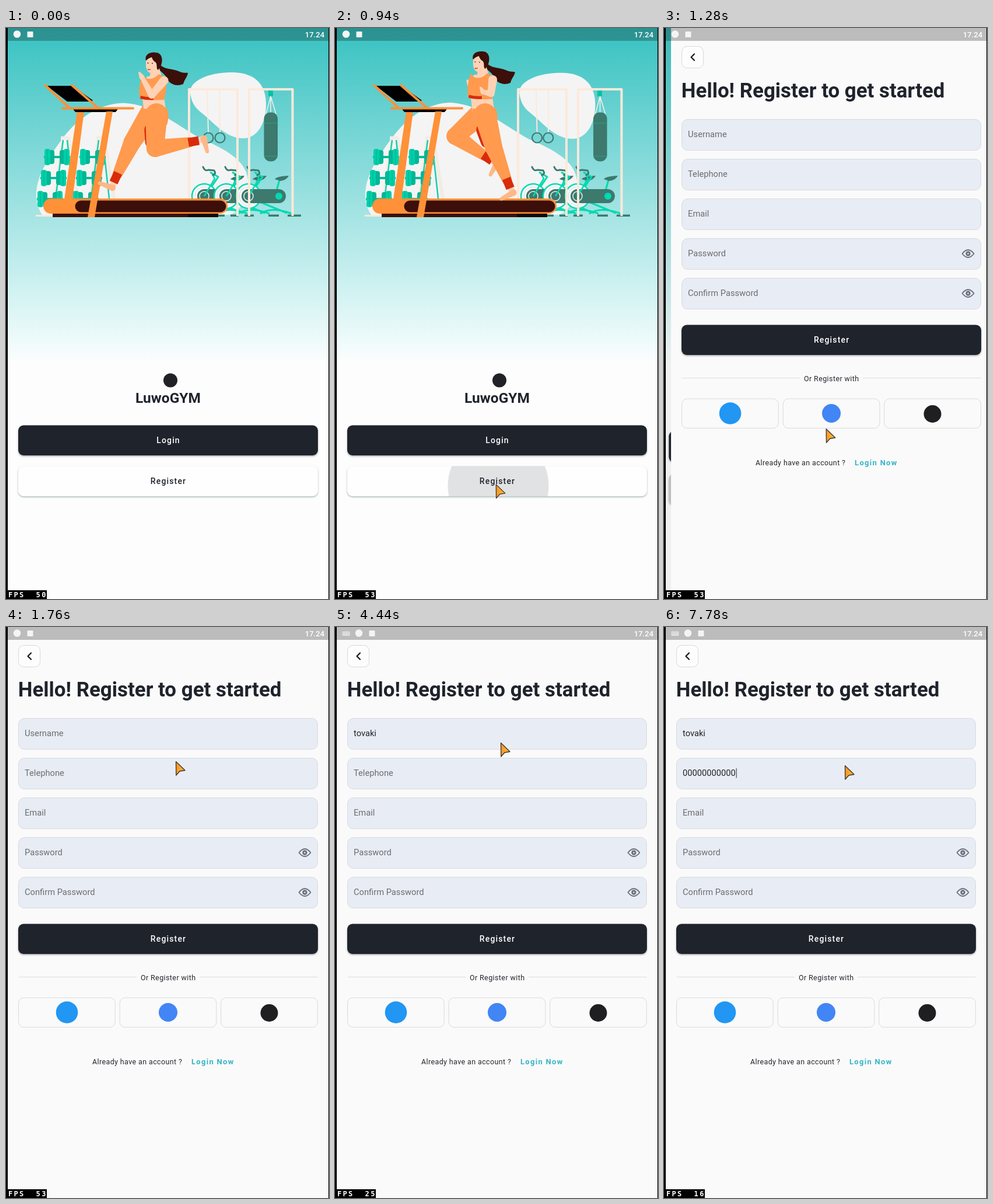
An HTML page with a canvas for the animation above (8000 ms loop, 554 by 978 pixels).

```html
<!DOCTYPE html>
<html lang="en">
<head>
<meta charset="utf-8">
<title>Gym sign-up</title>
<style>
html, body { margin: 0; width: 100%; height: 100%; overflow: hidden; background: #000; }
canvas { display: block; width: 554px; height: 978px; }
</style>
</head>
<body>
<canvas id="stage" width="554" height="978"></canvas>
<script>
const ctx = document.getElementById('stage').getContext('2d');
const LOOP = 8000, STRIDE = 1200, BLINK = 460;
const ORANGE = '#ff9a4f', STEEL = '#ff9138', SKIN = '#ffd2b5', RED = '#d92b0b', HAIR = '#3d0f0a';
const TEAL = '#00d9b2', PINE = '#3d796d', CREAM = '#fde9da', CLOUD = '#f4f4f4', INK = '#1f232c';

const SLIDE = 1053.7, FOCUS_NAME = 2300, FOCUS_PHONE = 5050;
const NAME = 'tovaki', NAME_KEYS = [2980, 3060, 3180, 3310, 3490, 3640];
const PHONE = '00000000000';
const PHONE_KEYS = [5840, 6200, 6330, 6590, 6720, 6980, 7110, 7310, 7440, 7710, 7780];
const FPS = [[0, 50], [740, 53], [1950, 40], [2980, 25], [4950, 14], [5920, 12], [7000, 16]];
const POINTER = [[0, 289, 985], [90, 289, 985], [450, 280, 796], [600, 280, 796], [860, 276, 782],
  [1140, 275, 779], [1680, 291, 230], [1840, 291, 230], [2200, 284, 198], [4500, 284, 198], [5000, 310, 237]];
// phase, thigh angle, shin angle; degrees from straight down, forward is positive
const GAIT = [[0, 2, -100], [.2, 32, -80], [.34, 60, -40], [.45, 56, -2], [.5, 33, 25],
  [.65, 12, 2], [.8, -18, -25], [.95, 0, -63], [1, 2, -100]];

const lerp = (a, b, k) => a + (b - a) * k;
const clamp = v => Math.max(0, Math.min(1, v));
const smooth = k => k * k * (3 - 2 * k);
const mix = (a, b, k) => a.map((v, i) => lerp(v, b[i], k));

function sample(keys, t, ease = k => k) {
  const i = keys.findIndex(k => k[0] > t);
  if (i < 0) return keys[keys.length - 1].slice(1);
  const a = keys[i - 1], b = keys[i];
  return mix(a, b, ease((t - a[0]) / (b[0] - a[0]))).slice(1);
}

function slideEase(x) {
  const bez = (s, a, b) => 3 * s * (1 - s) ** 2 * a + 3 * s * s * (1 - s) * b + s ** 3;
  let lo = 0, hi = 1;
  for (let i = 0; i < 20; i++) {
    const mid = (lo + hi) / 2;
    if (bez(mid, .35, .33) < x) lo = mid; else hi = mid;
  }
  return x >= 1 ? 1 : bez(lo, .91, .97);
}

function shape(d, fill) {
  ctx.fillStyle = fill;
  ctx.fill(new Path2D(d));
}
function line(d, color, width, cap = 'butt') {
  ctx.strokeStyle = color;
  ctx.lineWidth = width;
  ctx.lineCap = cap;
  ctx.lineJoin = 'round';
  ctx.stroke(new Path2D(d));
}
function disc(x, y, r, fill, stroke, width = 1) {
  ctx.beginPath();
  ctx.arc(x, y, r, 0, 7);
  if (fill) { ctx.fillStyle = fill; ctx.fill(); }
  if (stroke) { ctx.strokeStyle = stroke; ctx.lineWidth = width; ctx.stroke(); }
}
function box(x, y, w, h, r, fill, stroke, shadow) {
  ctx.save();
  ctx.beginPath();
  ctx.roundRect(x, y, w, h, r);
  if (shadow) { ctx.shadowColor = shadow; ctx.shadowBlur = 3; ctx.shadowOffsetY = 1.5; }
  if (fill) { ctx.fillStyle = fill; ctx.fill(); }
  ctx.shadowColor = 'transparent';
  if (stroke) { ctx.strokeStyle = stroke; ctx.lineWidth = 1; ctx.stroke(); }
  ctx.restore();
}
function text(s, x, y, size, weight, color, spacing = 0, align = 'left', family = 'Roboto, sans-serif') {
  ctx.font = `${weight} ${size}px ${family}`;
  ctx.letterSpacing = spacing + 'px';
  ctx.textAlign = align;
  ctx.fillStyle = color;
  ctx.fillText(s, x, y);
}
// Tapered round-ended segment
function limb([x1, y1], [x2, y2], r1, r2, color) {
  const a = Math.atan2(y2 - y1, x2 - x1);
  ctx.beginPath();
  ctx.arc(x1, y1, r1, a + Math.PI / 2, a - Math.PI / 2);
  ctx.arc(x2, y2, r2, a - Math.PI / 2, a + Math.PI / 2);
  ctx.closePath();
  ctx.fillStyle = color;
  ctx.fill();
}

function drawBlobs(sway) {
  const dx = -8 * sway, top = 128.5 - 2 * sway;
  shape(`M62 320C40 285 55 245 95 192C125 150 ${165 + dx} ${top} ${203 + dx} ${top}C${255 + dx} 132 ${290 + dx} 165 ${335 + dx} 190C${390 + dx} 213 420 235 415 275C410 300 395 320 380 320Z`, CLOUD);
  ctx.save();
  ctx.translate(sway, 2 * sway);
  shape('M316 112C313 90 350 76 385 76C425 75 446 95 446 130C446 165 430 190 405 189C375 188 355 160 335 145C322 135 318 125 316 112Z', CLOUD);
  ctx.restore();
}

function drawWeights() {
  for (const x of [0, 61]) {
    line(`M${97 + x} 188L${80 + x} 318M${94 + x} 188h14`, '#f3ece4', 5);
    line(`M${107 + x} 188L${124 + x} 292`, '#f3ece4', 6);
    line(`M${98 + x} 192L${85 + x} 292M${105 + x} 192L${116 + x} 292`, '#16cfae', 2.5);
    for (let row = 0; row < 3; row++) {
      const y = 221 + 36 * row, left = 73 + x - 6 * row;
      line(`M${left - 8} ${y}h45`, '#00bb9a', 4);
      for (const [px, dir] of [[left, 1], [left + 29, -1]]) {
        box(px - 5 + 5 * dir, y - 12, 10, 24, 4, '#00b795');
        box(px - 5 - 2 * dir, y - 14, 10, 28, 4, '#00cfa9');
        line(`M${px - 2 * dir} ${y - 12}v24`, '#00b18f', 1);
      }
    }
  }
}

function drawBike(x) {
  line(`M${x + 1} 289L${x + 24} 255L${x + 10} 247M${x + 54} 257L${x + 42} 300M${x} 290L${x + 66} 317M${x + 20} 318Q${x + 40} 305 ${x + 74} 318`, TEAL, 3);
  disc(x, 288, 21, '#fbfbfb', TEAL, 2.5);
  for (const r of [16, 12]) disc(x, 288, r, null, '#cfdedb');
  line(`M${x} 288h52`, PINE, 24, 'round');
  disc(x, 288, 8, PINE, '#e8f4f1', 1.5);
  disc(x + 52, 288, 6, TEAL);
  line(`M${x} 288L${x + 18} 258L${x + 12} 247`, TEAL, 2.5);
  line(`M${x - 2} 238q3 8 9 5l10 1q4 6 -2 8`, PINE, 3, 'round');
  shape(`M${x + 45} 259q3 -5 24 -6q-3 7 -14 9z`, PINE);
}

function drawGear(sway) {
  for (const x of [340, 378, 416]) drawBike(x);
  for (const [x, w] of [[364, 11], [385, 14], [409, 16], [450, 18], [483, 23]]) box(x, 319.5, w, 3.5, 0, PINE);
  const swing = -3 * sway;
  line(`M345 107L${347 + swing / 3} 179M366 107L${367 + swing} 179`, CREAM, 2);
  disc(347 + swing / 3, 188, 8.5, null, PINE, 2.2);
  disc(367 + swing, 188, 8.5, null, PINE, 2.2);
  line('M314 322V105H397V322M417 322V105H491.5V322', CREAM, 4);
  box(450, 107, 8, 10, 0, '#00c4a3');
  ctx.save();
  ctx.translate(1.5 * sway, 0);
  line('M454 117L446 147M454 117L463 147M454 117v30', '#f6efe8', 1.5);
  box(442.5, 144.5, 23.5, 84, 11, PINE);
  line('M443 163h23M443 219.5h23', '#23a48f', 1);
  ctx.restore();
}

function drawTreadmill() {
  line('M51 321.5h30', CREAM, 3);
  box(80, 316, 284, 8, 0, HAIR);
  box(312, 318, 52, 6, 0, '#170504');
  shape('M122 143H134L114 293H100Z', STEEL);
  box(64, 292, 316, 26, 13, STEEL);
  box(118.5, 295.5, 259, 20, 10, HAIR);
  shape('M115 139H192L188 144H119Z', '#000');
  shape('M172 143H183L152 324H140Z', STEEL);
  shape('M70 99H114L149 124L146 126H105Z', '#000');
  line('M67 98L109 137M113 98L158 137M97 137.5H218', STEEL, 4, 'round');
}

function legJoints(hip, phase) {
  const [thigh, shin] = sample(GAIT, phase % 1).map(d => d * Math.PI / 180);
  const knee = [hip[0] - 58 * Math.sin(thigh), hip[1] + 58 * Math.cos(thigh)];
  const ankle = [knee[0] - 76 * Math.sin(shin), knee[1] + 76 * Math.cos(shin)];
  return { hip, knee, ankle, shin };
}
function drawLeg({ hip, knee, ankle, shin }) {
  const c = Math.cos(shin), s = Math.sin(shin);
  const heel = [ankle[0] - 9 * s + 2 * c, ankle[1] + 9 * c + 2 * s];
  limb(ankle, heel, 5, 5.5, SKIN);
  limb(heel, [heel[0] - 23 * c - 2 * s, heel[1] - 23 * s + 2 * c], 5.5, 3, '#ffb787');
  limb(hip, knee, 19, 15, ORANGE);
  limb(knee, mix(knee, ankle, .8), 15, 8.5, ORANGE);
  line(`M${mix(knee, ankle, .76)}L${ankle}`, RED, 15);
}
function drawArm(joints) {
  const [shoulder, elbow, hand] = joints;
  limb(shoulder, elbow, 7.5, 6, SKIN);
  limb(elbow, hand, 6, 3.5, SKIN);
  limb(hand, [hand[0] - 4, hand[1] - 7], 4.5, 2, SKIN);
}
const swingArm = (front, back, k) => front.map((p, i) => mix(p, back[i], k));

function drawRunner(t) {
  const p = t / STRIDE, back = (1 - Math.cos(2 * Math.PI * p)) / 2;
  const near = legJoints([258 - 2 * back, 148], p), far = legJoints([248 + 5 * back, 147], p + .5);
  drawArm(swingArm([[235, 83], [212, 111], [190, 84]], [[246, 90], [260, 114], [258, 106]], 1 - back));
  drawLeg(far);
  const shade = k => mix(near.hip, near.knee, k).map((v, i) => v + (i ? 7 : -5));
  limb(shade(.35), shade(.68), 15, 13, RED);

  ctx.save();
  ctx.translate(-8 * back, -5 * back);
  shape(`M262 61C272 72 285 69 296 74C304 78 309 76 312 ${77 + 2 * back}C311 84 306 88 304 96C292 101 280 96 276 86C272 78 266 76 262 70Z`, HAIR);
  shape('M249 68L262 66L268 86L246 88Z', SKIN);
  shape('M241 50C239 62 239 74 247 77C257 77 263 68 263 58L257 46Z', SKIN);
  shape('M240 56C237 46 246 41 256 42C267 42 270 53 266 64L261 72C257 70 260 63 257 59C253 57 251 53 250 50C246 51 243 53 240 56Z', HAIR);
  disc(243.5, 60, .9, HAIR);
  disc(251, 60.5, .9, HAIR);
  line('M243 70.5q2 2 5 0', RED, 1.4);
  ctx.restore();

  ctx.save();
  ctx.translate(-3 * back, -4 * back);
  shape('M234 118H271L275 147H237Z', SKIN);
  shape('M234 78C238 90 252 90 262 79L273 84C277 98 274 112 271 123C256 124 242 124 230 121C226 108 230 92 234 78Z', ORANGE);
  shape('M231 116Q242 119 253 118V123Q241 124 230 121Z', RED);
  ctx.restore();

  shape('M236 138Q256 141 276 137Q281 152 276 166H240Q233 152 236 138Z', ORANGE);
  drawLeg(near);
  drawArm(swingArm([[271, 90], [250, 115], [233, 84]], [[270, 86], [295, 108], [286, 149]], back));
}

function button(label, y, fill, color, shadow) {
  box(21, y - .5, 514, 51.5, 9, fill, null, shadow);
  text(label, 278.5, y + 30, 14, 500, color, 1.15, 'center');
}

function drawWelcome(t) {
  const g = ctx.createLinearGradient(0, 0, 0, 572);
  g.addColorStop(0, '#37c2c1');
  g.addColorStop(.94, '#effbfb');
  g.addColorStop(1, '#fdfdfd');
  ctx.fillStyle = g;
  ctx.fillRect(0, 0, 556, 980);
  const sway = (1 - Math.cos(2 * Math.PI * t / STRIDE)) / 2;
  drawBlobs(sway);
  drawWeights();
  drawGear(sway);
  drawTreadmill();
  drawRunner(t);
  disc(282, 603.5, 12, '#202228');
  text('LuwoGYM', 278, 642, 24.5, 700, INK, 0, 'center');
  button('Login', 681, INK, '#fff', 'rgba(0,0,0,.35)');
  button('Register', 751, '#fefefe', INK, 'rgba(30,80,60,.4)');
  if (t > 870) {
    ctx.save();
    ctx.beginPath();
    ctx.roundRect(21, 750.5, 514, 51.5, 9);
    ctx.clip();
    const k = (t - 870) / 270;
    disc(280, 784, 30 + 215 * k, `rgba(30,35,44,${.24 * clamp(k * 2)})`);
    ctx.restore();
  }
}

function drawEye(y) {
  line(`M502.5 ${y}Q512.5 ${y - 13} 522.5 ${y}Q512.5 ${y + 13} 502.5 ${y}Z`, '#6a707c', 1.8);
  disc(512.5, y, 3.2, '#6a707c', '#6a707c', 2);
  disc(512.5, y, 1.3, '#e8ecf4');
}

function drawField(i, hint, value, caret) {
  const y = 156 + 68 * i;
  box(21.5, y + .5, 513, 53, 10, '#e8ecf4', '#d8dadf');
  text(value || hint, 32, y + 31, 14.7, 400, value ? '#222429' : '#6c6d71');
  if (caret) {
    const x = 32.8 + (value ? ctx.measureText(value).width : 0);
    box(x, y + 18, 1.2, 16.5, 0, '#4a4c52');
  }
}

const typed = (s, keys, t) => s.slice(0, keys.filter(k => k <= t).length);
function caretOn(t, from, to, keys) {
  if (t < from || t >= to) return false;
  const last = Math.max(from, ...keys.filter(k => k <= t));
  return Math.floor((t - last) / BLINK) % 2 === 0;
}

function drawForm(t) {
  ctx.fillStyle = '#fafafa';
  ctx.fillRect(3, 0, 551, 978);
  box(21.5, 31.5, 37, 37, 9, '#fdfdfd', '#d9d9d9');
  line('M43 44.5L37.5 50L43 55.5', '#16181c', 2.2, 'round');
  text('Hello! Register to get started', 20.8, 119, 34.9, 700, INK);
  drawField(0, 'Username', typed(NAME, NAME_KEYS, t), caretOn(t, FOCUS_NAME, FOCUS_PHONE, NAME_KEYS));
  drawField(1, 'Telephone', typed(PHONE, PHONE_KEYS, t), caretOn(t, FOCUS_PHONE, LOOP, PHONE_KEYS));
  ['Email', 'Password', 'Confirm Password'].forEach((hint, i) => drawField(i + 2, hint));
  drawEye(386.5);
  drawEye(454.5);
  button('Register', 509, INK, '#fff', 'rgba(0,0,0,.35)');
  line('M21.5 599.5H224M332 599.5H534.5', '#dcdcdc', 1);
  text('Or Register with', 278.2, 605, 12.5, 400, '#25282f', .4, 'center');
  for (const x of [21.5, 195.2, 368.7]) box(x, 635, 165.7, 50.5, 9, null, '#dadadc');
  disc(104.5, 660, 18.8, '#2196f3');
  if (t > 1200) {
    disc(278, 660, 16, '#4285f4');
    disc(451.5, 661, 15, '#1f1f21');
  }
  text('Already have an account ?', 148, 749, 12.5, 400, '#25282f', .38);
  text('Login Now', 318, 749, 13, 700, '#35b5c8', 1.3);
}

function drawStatus(t) {
  ctx.fillStyle = 'rgba(0,0,0,.25)';
  ctx.fillRect(3, 0, 551, 22);
  let x = 19;
  if (t >= FOCUS_NAME) {
    box(12.5, 7.5, 13, 7.5, 1, 'rgba(255,255,255,.55)');
    for (let i = 0; i < 8; i++) box(14 + 2.8 * (i % 4), 9 + 2 * (i >> 2), 1, 1, 0, '#b9b9b9');
    x += 22;
  }
  disc(x, 10.5, 6.3, '#f4f4f4');
  box(x + 17.5, 6, 10, 10, 1, '#f4f4f4');
  text('17.24', 512.7, 16, 13.1, 500, '#fff');
}

function drawFps(t) {
  const value = FPS.filter(f => f[0] <= t).pop()[1];
  box(3, 963, 67, 15, 0, '#000');
  text('FPS  ' + value, 4, 975, 12, 700, '#fff', 2.3, 'left', '"DejaVu Sans Mono", monospace');
}

function drawPointer(t) {
  const [x, y] = sample(POINTER, t, smooth);
  ctx.save();
  ctx.translate(x, y);
  const g = ctx.createLinearGradient(0, 0, 16, 0);
  g.addColorStop(0, '#f7942a');
  g.addColorStop(1, '#ffbc33');
  const d = 'M.5 .5L16 15.5L7 17L.8 24Z';
  shape(d, g);
  line(d, '#3b3430', 1.3);
  ctx.restore();
}

function draw(t) {
  const e = slideEase(clamp((t - SLIDE) / 300));
  ctx.save();
  ctx.beginPath();
  ctx.rect(3, 0, 550, 978);
  ctx.clip();
  if (e < 1) {
    ctx.save();
    ctx.translate(278, 489);
    ctx.scale(1 + .05 * e, 1 + .05 * e);
    ctx.translate(-278, -489);
    drawWelcome(t);
    ctx.restore();
    ctx.fillStyle = `rgba(0,0,0,${.055 * e})`;
    ctx.fillRect(3, 0, 550, 978);
  }
  if (e > 0) {
    ctx.save();
    ctx.translate(550 * (1 - e), 0);
    drawForm(t);
    ctx.restore();
  }
  drawStatus(t);
  drawPointer(t);
  drawFps(t);
  ctx.restore();
}

const start = performance.now();
function tick() {
  ctx.fillStyle = '#000';
  ctx.fillRect(0, 0, 554, 978);
  draw((performance.now() - start) % LOOP);
  requestAnimationFrame(tick);
}
tick();
</script>
</body>
</html>
```
